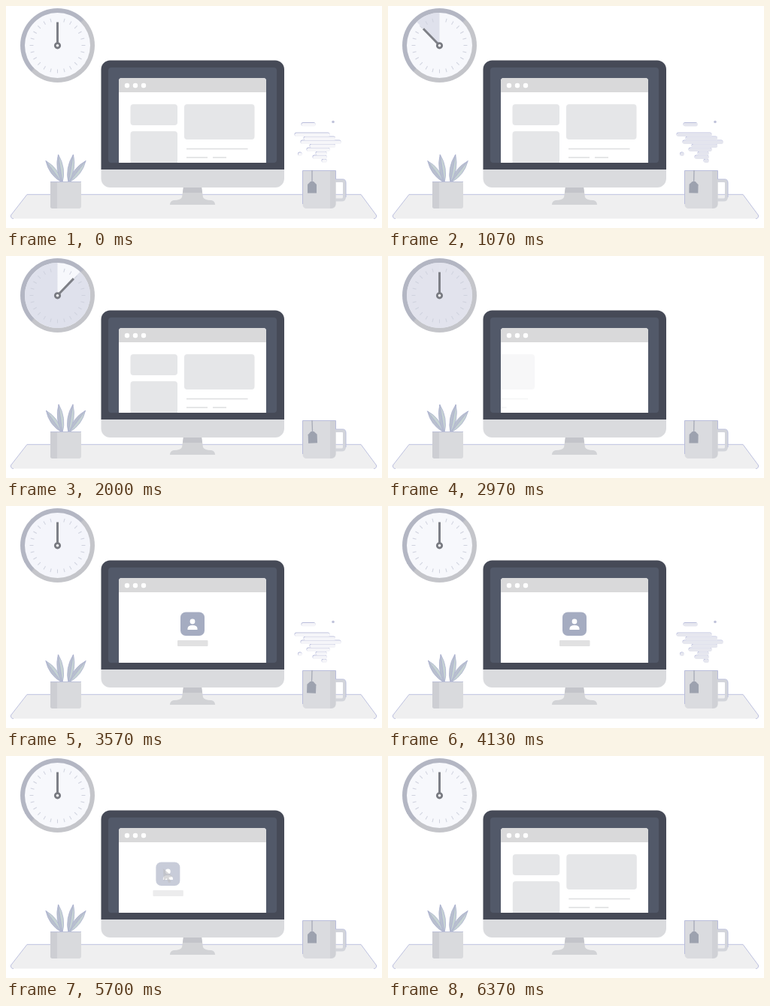
An HTML page that plays this animation: 500x296 px, repeating every 6660 ms.

```html
<!DOCTYPE html>
<html lang="en">
<head>
<meta charset="utf-8">
<title>Desk</title>
<style>
html, body { margin: 0; width: 100%; height: 100%; overflow: hidden; background: #fff; }
svg { display: block; width: 500px; height: 296px; }
</style>
</head>
<body>
<svg viewBox="0 0 500 296">
  <defs>
    <linearGradient id="rim" x1="0" y1="0" x2="1" y2="1">
      <stop offset=".49" stop-color="#b3b6c3"/><stop offset=".51" stop-color="#c4c5ca"/>
    </linearGradient>
    <clipPath id="view"><path d="M150 115H346V209H150Z"/></clipPath>
    <clipPath id="abovePot"><path d="M40 180H120V235H40Z"/></clipPath>
  </defs>

  <path d="M28 251H472L492.500 279Q493 283.500 489 283.500H10Q6 283.500 6.500 279Z" fill="#efeff0"/>
  <path d="M10 283.500Q6 283.500 6.500 279L28 251.300H472L492.500 279Q493 283.500 489 283.500" fill="none" stroke="#bdc1e0"/>

  <g id="clock">
    <circle cx="68.5" cy="52.500" r="49.500" fill="url(#rim)"/>
    <circle cx="68.5" cy="52.500" r="43.500" fill="#f7f8fc"/>
    <path id="sweep" fill="#dfe1ec"/>
    <g id="ticks" stroke="#cfd2de"/>
    <path id="hand" d="M68.500 21.500V49" stroke="#7e8087" stroke-width="3"/>
    <circle cx="68.5" cy="52.800" r="3.200" fill="#fff" stroke="#797b82" stroke-width="2.800"/>
  </g>

  <g id="leaves" clip-path="url(#abovePot)" stroke="#adb2d0" stroke-width=".8"></g>
  <rect x="59" y="234" width="41" height="36" rx="3" fill="#d9dadd"/>
  <path d="M59 234H68V270H62Q59 270 59 267Z" fill="#cdced3"/>
  <path d="M59 234.500H100" stroke="#bcc0d8"/>

  <path d="M236 241H260L262 255Q264 259 273 259Q278 260 278 265H218Q218 260 223 259Q232 259 234 255Z" fill="#d2d3d6"/>
  <path d="M236 241H260L261 249H235Z" fill="#c3c4ca"/>
  <path d="M126.500 217H370V230A12 12 0 0 1 358 242H138.500A12 12 0 0 1 126.500 230Z" fill="#dadbde"/>
  <path d="M126.500 218V84.500A12 12 0 0 1 138.500 72.500H358A12 12 0 0 1 370 84.500V218Z" fill="#464a57"/>
  <rect x="136" y="82" width="224" height="127" rx="4" fill="#525969"/>
  <path d="M150 209V100Q150 96 154 96H342Q346 96 346 100V209Z" fill="#fff"/>
  <path d="M150 115V100Q150 96 154 96H342Q346 96 346 100V115Z" fill="#d9d9da"/>
  <path d="M161 106H161.010M172 106H172.010M183 106H183.010" stroke="#fff" stroke-width="6.400" stroke-linecap="round"/>

  <g clip-path="url(#view)">
    <g id="page" fill="#e5e6e8">
      <rect x="165.500" y="131" width="62.500" height="28" rx="4"/>
      <rect x="165.500" y="167" width="62.500" height="50" rx="4"/>
      <rect x="237" y="131" width="93.500" height="47" rx="4"/>
      <path d="M240 190.500H321.500M240 202H268M275 202H293" stroke="#dddee0" stroke-width="1.400"/>
    </g>
    <g id="profile">
      <rect x="232" y="141.500" width="32" height="31.500" rx="7" fill="#a5acc1"/>
      <circle cx="248" cy="154" r="3.400" fill="#fff"/>
      <path d="M241.500 165V163.500Q241.500 159 248 159T254.500 163.500V165Z" fill="#fff"/>
      <rect x="228" y="179" width="40.500" height="8" rx="1" fill="#e1e1e2"/>
    </g>
    <path id="cursor" d="M0 0L13 11L7.500 12L10.500 18L7.500 19L4.500 13L1 17Z" fill="#bdbdc0"/>
  </g>

  <g id="steam" fill="none" stroke-linecap="round"></g>
  <path d="M438 233H447Q450 233 450 236V255Q450 258.500 446 258.500H438" fill="none" stroke="#d3d5db" stroke-width="4"/>
  <path d="M438 231H448Q452 231 452 236V255" fill="none" stroke="#bcc0dc"/>
  <path d="M394.500 219.500H438.500V264Q438.500 270 432 270H400Q394.500 270 394.500 264Z" fill="#dadbdf"/>
  <path d="M431 220H438.500V264Q438.500 269 431 270Z" fill="#d0d1d6"/>
  <path d="M394.500 264V219.500H438.500V231" fill="none" stroke="#b9bddb"/>
  <g id="tag">
    <path d="M407 219V234" stroke="#a5a9b6" stroke-width="1.300"/>
    <path d="M401 238L405 234H409L413 238V249.500H401Z" fill="#9da2af"/>
  </g>
</svg>
<script>
const LOOP = 6660, CX = 68.5, CY = 52.5, R = 43.5, TAU = Math.PI * 2;
const $ = id => document.getElementById(id);
const set = (el, attrs) => { for (const k in attrs) el.setAttribute(k, attrs[k]); };
const add = (parent, tag, attrs) => {
  const el = document.createElementNS('http://www.w3.org/2000/svg', tag);
  set(el, attrs);
  return parent.appendChild(el);
};

const part = (t, from, to) => Math.min(1, Math.max(0, (t - from) / (to - from)));
const inOut = p => p < .5 ? 4 * p ** 3 : 1 - 4 * (1 - p) ** 3;
const out = p => 1 - (1 - p) ** 3;
const mix = (a, b, p) => a + (b - a) * p;

for (let angle = 15; angle < 360; angle += 15) {
  add($('ticks'), 'path', { d: 'M68.5 15.5V20.5', transform: `rotate(${angle} ${CX} ${CY})` });
}

function leaf(x, y, tx, ty, side) {
  const g = add($('leaves'), 'g', {});
  const len = Math.hypot(tx - x, ty - y), width = 8;
  const nx = (ty - y) / len * width, ny = (x - tx) / len * width;
  const mx = (x + tx) / 2, my = (y + ty) / 2;
  const half = (s, fill) => add(g, 'path', {
    d: `M${x} ${y}Q${mx + nx * s} ${my + ny * s} ${tx} ${ty}Z`, fill
  });
  half(1, '#b9c0ce');
  half(-1, '#c6d3d3');
  return { g, x, y, side };
}

// Mirrored pairs: a wide outer leaf and a tall inner one
const leaves = [-1, 1].flatMap(s => [
  leaf(79 + 5 * s, 235, 79.5 + 26.5 * s, 206.5, s),
  leaf(79 + 4 * s, 236, 79.5 + 10 * s, 198, s)
]);

// Rows narrow towards the mug, with staggered left ends
let cloud = 'M395 157.5H409M390.5 197H391';
for (let i = 0; i < 8; i++) {
  const left = 386 + 4 * i + (i % 2) * 8;
  const right = Math.max(424, 443 - 7.5 * Math.abs(i - 2));
  cloud += `M${left} ${171 + 5 * i}H${right}`;
}
add($('steam'), 'path', { d: cloud, stroke: '#b9bddb', 'stroke-width': 5 });
add($('steam'), 'path', { d: cloud, stroke: '#fff', 'stroke-width': 4.6, transform: 'translate(.4 .8)' });
const haze = add($('steam'), 'path', { d: cloud, stroke: '#e4e5ee', 'stroke-width': 4.6, transform: 'translate(.4 .8)' });
add($('steam'), 'circle', { cx: 435, cy: 154.5, r: 1.8, fill: '#bfc2da' });

function drawClock(t) {
  const angle = 360 * inOut(part(t, 295, 2775));
  const a = Math.min(angle, 359.9) * Math.PI / 180;
  const x = CX - R * Math.sin(a), y = CY - R * Math.cos(a);
  set($('sweep'), {
    d: `M${CX} ${CY}V${CY - R}A${R} ${R} 0 ${angle > 180 ? 1 : 0} 0 ${x} ${y}Z`,
    opacity: .5 + .5 * Math.cos(Math.PI * part(t, 2700, 3850))
  });
  set($('hand'), { transform: `rotate(${-angle} ${CX} ${CY})` });
}

function drawScreen(t) {
  const leave = part(t, 2700, 3200);
  const back = t > 6000;
  const pageX = back ? 190 * (1 - out(part(t, 6080, 6410))) : -220 * inOut(leave);
  set($('page'), {
    transform: `translate(${pageX} 0)`,
    opacity: back ? part(t, 6080, 6300) : Math.max(0, 1 - 1.3 * leave)
  });

  const go = part(t, 5550, 5930);
  const exit = -130 * inOut(go);
  set($('profile'), {
    transform: `translate(${130 * (1 - out(part(t, 3080, 3520))) + exit} 0)`,
    opacity: part(t, 3080, 3400) * (1 - go)
  });

  const reach = inOut(part(t, 4370, 5090));
  set($('cursor'), {
    transform: `translate(${mix(273.5, 241.5, reach) + exit} ${mix(231, 150, reach)})`,
    opacity: t < 4370 ? 0 : 1 - go
  });
}

function drawSteam(t) {
  const puff = Math.sin(Math.PI * part((t + 250) % 3550, 0, 2250));
  set($('steam'), { opacity: Math.min(1, 4 * puff) });
  set(haze, { opacity: puff });
}

function draw(t) {
  drawClock(t);
  drawScreen(t);
  drawSteam(t);
  const sway = Math.sin(TAU * 2 * part(t, 0, 4830));
  for (const { g, x, y, side } of leaves) set(g, { transform: `rotate(${sway * side} ${x} ${y})` });
  const swing = 2 * Math.sin(TAU * 2 * part(t, 0, 5460));
  set($('tag'), { transform: `rotate(${swing} 407 219)` });
}

const start = performance.now();
function tick() {
  draw((performance.now() - start) % LOOP);
  requestAnimationFrame(tick);
}
tick();
</script>
</body>
</html>
```
